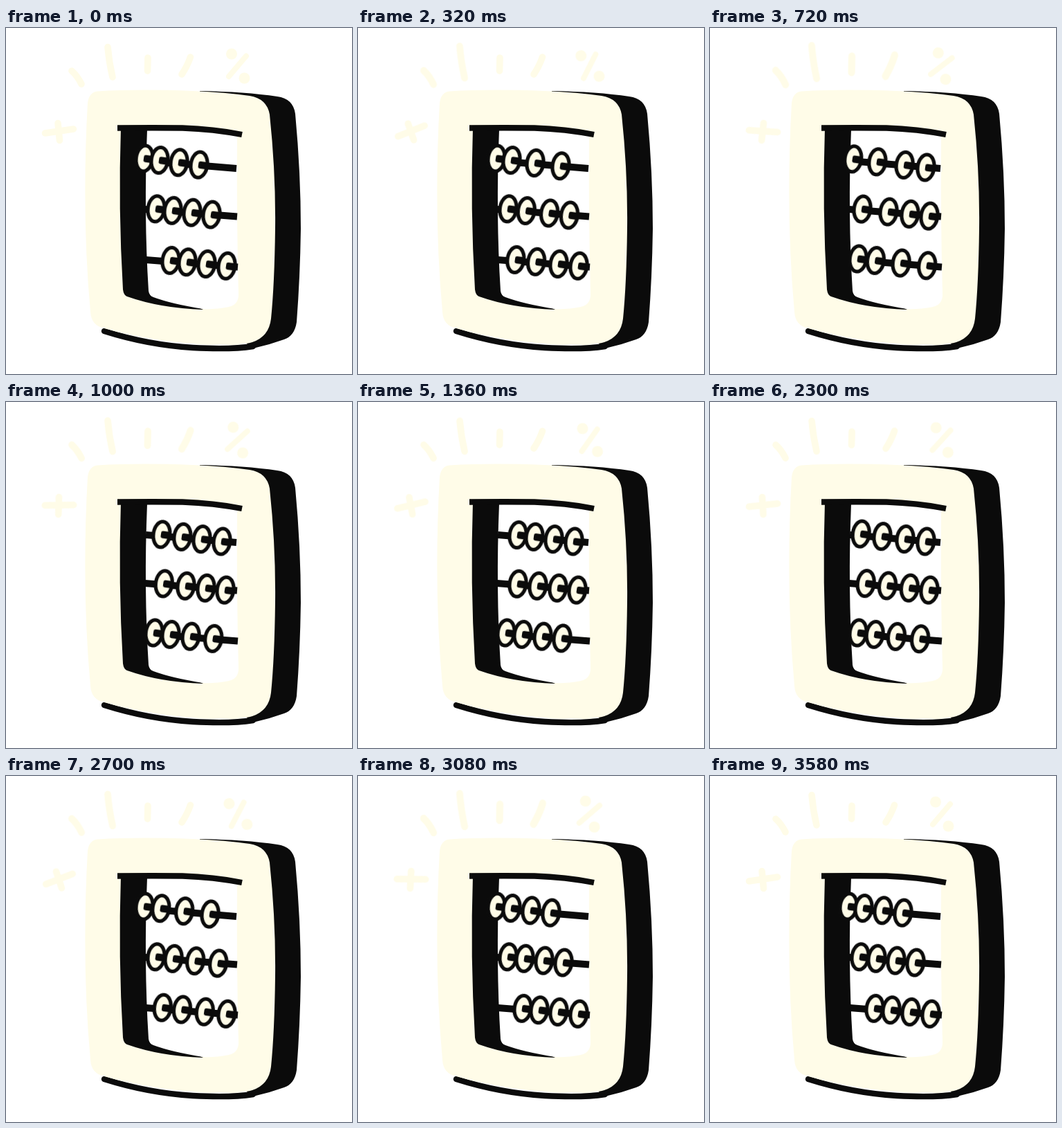
Write an HTML page that moves like this. It is 500 px wide and 500 px high and loops after 3.6 s.

```html
<!DOCTYPE html>
<html lang="en">
<head>
<meta charset="utf-8">
<title>Abacus</title>
<style>
  html, body { margin: 0; width: 100%; height: 100%; overflow: hidden; background: #fff; }
  svg { display: block; width: 100vw; height: 100vh; }
  .cream { fill: #fffce8; }
  .ink { fill: #0b0b0b; }
  .rod, .bar { fill: none; stroke: #0b0b0b; }
  .rod { stroke-width: 9.8; }
  .bar { stroke-width: 8.4; }
  .bead ellipse { fill: #fffce8; stroke: #0b0b0b; stroke-width: 5.2; }
  .sparks { fill: none; stroke: #fffce8; stroke-width: 9.6; stroke-linecap: round; }
  .sparks circle { fill: #fffce8; stroke: none; }
  .rock { animation: rock 1.2s cubic-bezier(.37, 0, .63, 1) infinite; }
  .plus { transform-origin: 76.5px 149px; }
  .percent { transform-origin: 335px 54.5px; }
  .ray { transform-box: fill-box; transform-origin: center; animation: stretch 1.2s ease-in-out infinite; }
  .late { animation-name: stretch-late; }
  @keyframes rock {
    33.33% { transform: rotate(-15deg); }
    66.67% { transform: rotate(15deg); }
  }
  @keyframes stretch {
    50% { transform: scale(1.03, 1.1); }
  }
  @keyframes stretch-late {
    0%, 27% { transform: none; }
    62% { transform: scale(1.06, 1.2); }
  }
</style>
</head>
<body>
<svg viewBox="0 0 500 500">
  <g class="sparks">
    <g class="rock plus"><path d="M56.500 152 97.500 146M75 137.500 77.500 162.500"/></g>
    <path class="ray" d="M95 62Q103 69 109 81"/>
    <path class="ray" d="M147 27.500Q149 50 154 71"/>
    <path class="ray late" d="M205 43 204.500 62"/>
    <path class="ray late" d="M266.500 42Q262 55 254 67"/>
    <g class="rock percent">
      <path d="M347 40.500 322 70" stroke-width="8"/>
      <circle cx="326" cy="37.500" r="8"/>
      <circle cx="344.500" cy="72.500" r="8"/>
    </g>
  </g>

  <path class="ink" d="M280 91Q345 92 392 99Q415 102 418 124Q426 210 426 290Q425 360 420 425Q417 445 402 450Q380 458 357 463L340 450Z"/>
  <path class="bar" stroke-linecap="round" d="M142 438Q205 458 270 462Q325 465 357 460"/>
  <path class="cream" d="M132 91.500Q190 88 270 91Q318 93 352 98Q377 102 381 125Q390 210 389 290Q388 370 383 420Q380 446 356 454Q340 459 300 458Q215 455 142 434Q123 430 122 410Q109 270 118 108Q120 93 132 91.500Z"/>

  <path class="ink" d="M166 144H230V380L285 407Q223 405 175 388Q170 386 169 378Q162 260 166 144Z"/>
  <path fill="#fff" d="M204 147Q270 147 334 156Q333 270 336 385Q336 400 322 403Q300 407 285 406Q240 399 213 389Q207 387 206 380Q199 270 204 147Z"/>
  <path class="bar" d="M161 144.500Q215 144 255 144.500Q300 146 341 154"/>

  <g id="rows"></g>
</svg>
<script>
  const NS = "http://www.w3.org/2000/svg";
  const LOOP = 3600, MOVE = 710;
  const EASE = "cubic-bezier(.37, 0, .63, 1)";

  // Bead positions at rest and when pushed, with the start times of both moves.
  const rows = [
    { rod: [202, 192, 333, 203], y: 188.5, x0: 200, slope: .116,
      from: [200, 222, 250, 279], to: [231, 255, 283, 312],
      go: [500, 320, 120, 0], back: [1985, 2100, 2220, 2340] },
    { rod: [201, 262, 334, 272.5], y: 261.3, x0: 217, slope: .104,
      from: [217, 241, 269, 297], to: [231, 260, 289, 317],
      go: [500, 160, 20, 0], back: [1985, 2100, 2220, 2340] },
    { rod: [202, 335, 335, 345.5], y: 333.5, x0: 214, slope: .098,
      from: [238, 262, 290, 319], to: [214, 238, 267, 295],
      go: [0, 120, 320, 500], back: [2340, 2260, 2150, 2010] }
  ];

  function add(parent, tag, attrs) {
    const el = document.createElementNS(NS, tag);
    for (const key in attrs) el.setAttribute(key, attrs[key]);
    return parent.appendChild(el);
  }

  function addBead(parent, row, i) {
    const at = x => `translate(${x}px, ${row.y + row.slope * (x - row.x0)}px)`;
    const rest = at(row.from[i]), pushed = at(row.to[i]);
    const key = (time, transform) => ({ offset: time / LOOP, transform, easing: EASE });
    const bead = add(parent, "g", { class: "bead" });
    const tilt = add(bead, "g", { transform: "rotate(8)" });
    add(tilt, "ellipse", { rx: 11.9, ry: 18.7 });
    add(tilt, "rect", { class: "ink", x: -1, y: -5.2, width: 13, height: 10.4, rx: 3 });
    bead.animate([
      key(0, rest),
      key(row.go[i], rest),
      key(row.go[i] + MOVE, pushed),
      key(row.back[i], pushed),
      key(row.back[i] + MOVE, rest),
      key(LOOP, rest)
    ], { duration: LOOP, iterations: Infinity });
  }

  const holder = document.getElementById("rows");
  for (const row of rows) {
    const [x1, y1, x2, y2] = row.rod;
    add(holder, "line", { class: "rod", x1, y1, x2, y2 });
    row.from.forEach((_, i) => addBead(holder, row, i));
  }
</script>
</body>
</html>
```
